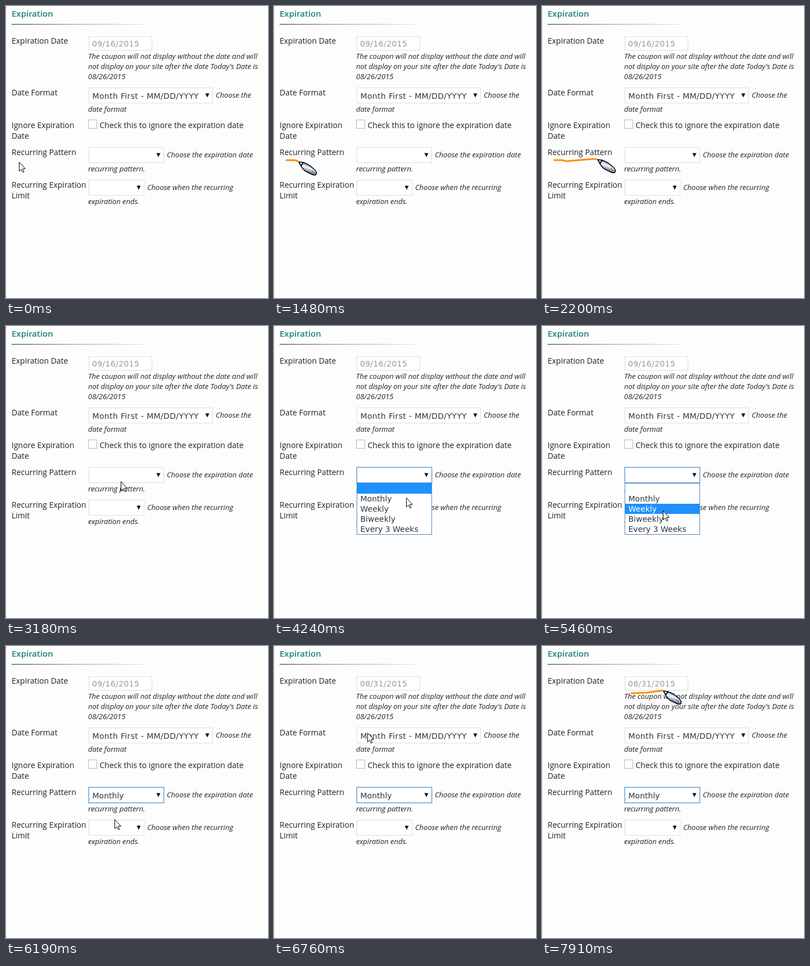
Recreate the animation shown at these times as an HTML page. Size 466x519 px, loop 8 s.

```html
<!DOCTYPE html>
<html lang="en">
<head>
<meta charset="utf-8">
<title>Coupon expiration form</title>
<style>
html, body { margin: 0; width: 100%; height: 100%; overflow: hidden; background: #fdfdfd; }
svg { display: block; width: 466px; height: 519px; }
text { white-space: pre; }
.label { font: 14px "Open Sans", sans-serif; fill: #222; }
.hint { font: italic 13px "Open Sans", sans-serif; fill: #222; }
.title { font: 600 15px "Open Sans", sans-serif; fill: #1f8177; }
.field { font: 14px "DejaVu Sans", sans-serif; fill: #32373c; }
.wide { letter-spacing: .35px; }
.muted { fill: #999; }
.box { fill: #fff; stroke: #ddd; }
.focus { fill: none; stroke: #5b9dd9; }
.glow { fill: none; stroke: #5b9dd9; stroke-opacity: .4; }
.ink { fill: none; stroke: #ff8c0a; stroke-width: 3; stroke-linejoin: round; }
</style>
</head>
<body>
<svg viewBox="0 0 466 519">
  <defs>
    <linearGradient id="fade">
      <stop offset="0" stop-color="#222"/>
      <stop offset=".5" stop-color="#999"/>
      <stop offset="1" stop-color="#e6e6e6"/>
    </linearGradient>
    <linearGradient id="barrel" x1=".62" y1=".2" x2=".4" y2=".75">
      <stop offset="0" stop-color="#8fa3b8"/>
      <stop offset=".45" stop-color="#f4f8fc"/>
      <stop offset="1" stop-color="#71859c"/>
    </linearGradient>
  </defs>
  <rect width="466" height="519" fill="#fdfdfd"/>
  <rect width="1" height="519" fill="#e5e5e5"/>
  <rect x="10" y="32" width="241" height="1" fill="url(#fade)"/>
  <g id="form"></g>
  <g id="focus">
    <rect class="glow" x="146.5" y="250.5" width="135" height="29"/>
    <rect class="focus" x="147.5" y="251.5" width="133" height="27"/>
  </g>
  <g id="list">
    <rect x="147.5" y="279.5" width="133" height="91" fill="#fff" stroke="#5585c5"/>
    <rect id="bar" x="148" width="132" height="18" fill="#1e90ff"/>
  </g>
  <polyline id="ink" class="ink"/>
  <path id="arrow" d="M.5 .5V16.6L4.2 13.2 6.7 18.6 9 17.5 6.6 12.2H11.4Z" fill="#fff" stroke="#000"/>
  <g id="pen" stroke="#000" stroke-width="1.6" stroke-linejoin="round">
    <path d="M9 2Q20 6 28 14Q34 19 32 23Q30 26 24 23L12 17Q7 13 5 8Z" fill="url(#barrel)"/>
    <path d="M1 1L9 2 5 8Z" fill="#dde5ee"/>
    <path d="M24 16L29 21" stroke="#33475c" stroke-width="1"/>
  </g>
</svg>
<script>
const LOOP = 8000;
const byId = id => document.getElementById(id);

function add(parent, tag, attrs, content = "") {
  const node = document.createElementNS("http://www.w3.org/2000/svg", tag);
  for (const key in attrs) node.setAttribute(key, attrs[key]);
  node.textContent = content;
  parent.append(node);
  return node;
}

const form = byId("form");
const write = (style, x, y, content, parent = form) => add(parent, "text", { class: style, x, y }, content);
const box = (x, y, w, h) => add(form, "rect", { class: "box", x: x + .5, y: y + .5, width: w - 1, height: h - 1 });

function select(y, w) {
  box(147, y, w, 28);
  add(form, "path", { d: `M${147 + w - 13.5} ${y + 10.5}h7l-3.5 7z`, fill: "#000" });
}

write("title", 10, 19, "Expiration");
[[67, "Expiration Date"], [159, "Date Format"], [217, "Ignore Expiration"], [236, "Date"],
 [265, "Recurring Pattern"], [323, "Recurring Expiration"], [342, "Limit"]]
  .forEach(([y, s]) => write("label", 10, y, s));

box(147, 54, 113, 25);
select(145, 221);
select(251, 134);
select(309, 99);
box(146, 202, 16, 16).style.stroke = "#b4b9be";

const dateText = write("field wide muted", 153, 72, "");
write("field wide", 153.5, 165, "Month First - MM/DD/YYYY");
const patternText = write("field", 153.5, 271, "");
write("label", 166.5, 217, "Check this to ignore the expiration date");
[[146, 94, "The coupon will not display without the date and will"],
 [146, 112, "not display on your site after the date Today's Date is"],
 [146, 130, "08/26/2015"], [373, 163, "Choose the"], [146, 188, "date format"],
 [286, 269, "Choose the expiration date"], [146, 294, "recurring pattern."],
 [251, 327, "Choose when the recurring"], [146, 352, "expiration ends."]]
  .forEach(([x, y, s]) => write("hint", x, y, s));

const options = ["", "Monthly", "Weekly", "Biweekly", "Every 3 Weeks"]
  .map((s, i) => write("field", 153.5, 294 + 18 * i, s, byId("list")));

// Pointer poses, each held until the next: time, x, y, mode (default arrow)
const poses = [
  [0, 23, 277], [680, 17, 274],
  [1240, 21, 274, "draw"], [1360, 37, 274, "draw"], [1480, 43, 276, "draw"], [1630, 53, 275, "draw"],
  [1780, 65, 274, "draw"], [1930, 77, 273, "draw"], [2070, 89, 272, "draw"], [2200, 98, 272, "draw"],
  [2320, 101, 271, "draw"],
  [2750, 133, 273, "lift"], [2890, 180, 278, "lift"], [3040, 205, 280, "lift"],
  [3180, 204, 276], [3450, 213, 272], [3600, 228, 267], [3750, 236, 265], [4080, 236, 280],
  [4240, 235, 305], [4360, 284, 320], [4480, 262, 327], [4640, 274, 349], [4780, 285, 368],
  [5310, 258, 353], [5460, 215, 328], [5610, 203, 316], [5750, 196, 310], [5890, 193, 308],
  [6620, 181, 230], [6760, 166, 154], [6880, 163, 127], [7000, 160, 105], [7120, 158, 92], [7240, 158, 85],
  [7640, 158, 84, "draw"], [7780, 186, 83, "draw"], [7910, 215, 79, "draw"]
];
const highlights = [[0, 0], [5310, 4], [5460, 2], [5610, 1]];

const show = (id, on) => byId(id).style.display = on ? "" : "none";
const until = (steps, t) => steps.filter(step => step[0] <= t);

function render(t) {
  const past = until(poses, t);
  const [, x, y, mode] = past.at(-1);
  const stroke = past.slice(past.findLastIndex(p => !p[3]) + 1).filter(p => p[3] === "draw");
  byId("ink").setAttribute("points", stroke.map(p => `${p[1]},${p[2]}`).join(" "));
  show("arrow", !mode);
  show("pen", mode);
  byId(mode ? "pen" : "arrow").setAttribute("transform", `translate(${x} ${y})`);

  show("focus", t >= 3750);
  show("list", t >= 3900 && t < 6190);
  const active = until(highlights, t).at(-1)[1];
  byId("bar").setAttribute("y", 280 + 18 * active);
  options.forEach((option, i) => option.style.fill = i === active ? "#fff" : "");
  patternText.textContent = t >= 6190 ? "Monthly" : "";
  dateText.textContent = t >= 6350 ? "08/31/2015" : "09/16/2015";
}

const start = performance.now();
function tick(now) {
  render(Math.max(0, now - start) % LOOP);
  requestAnimationFrame(tick);
}
render(0);
requestAnimationFrame(tick);
</script>
</body>
</html>
```
